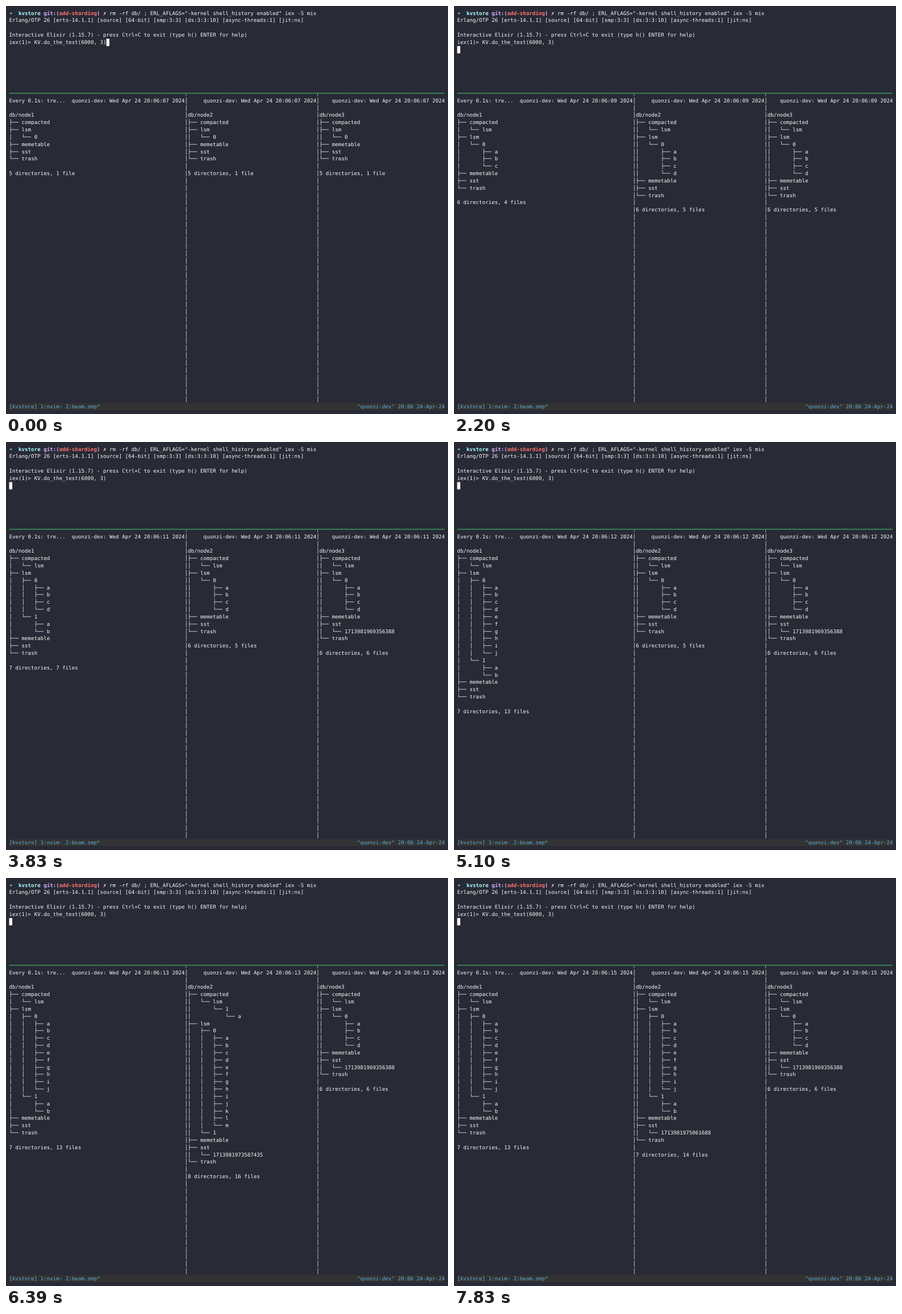
Recreate the animation shown at these times as an HTML page with a canvas. Size 778 px wide and 719 px high, loop 8 s.

```html
<!DOCTYPE html>
<html lang="en">
<head>
<meta charset="utf-8">
<title>Sharded store test</title>
<style>
html, body { margin: 0; width: 100%; height: 100%; overflow: hidden; background: #282a36; }
canvas { display: block; }
</style>
</head>
<body>
<canvas id="term" width="778" height="719"></canvas>
<script>
const ctx = document.getElementById('term').getContext('2d');
const LOOP = 8000, COLS = 139, ROWS = 55;
const W = 778 / (COLS + 2), H = 719 / (ROWS + 1), SIZE = H / 1.4;
const FONT = `${SIZE}px "DejaVu Sans Mono", "DejaVu Sans", monospace`;
const BG = '#282a36', FG = '#f8f8f2', GREEN = '#50fa7b', BAR = '#333333', BLUE = '#5eacd3';
const HOST = 'quonzi-dev';
const CLOCK = [840, 1790, 2820, 3830, 4780, 5780, 6800, 7780];

const cellX = col => (col + 1) * W;
const cellY = row => (row + 0.5) * H;

// Each word starts on its own terminal cell.
function text(col, row, str, color = FG, bold = false) {
  ctx.font = (bold ? 'bold ' : '') + FONT;
  ctx.fillStyle = color;
  for (const m of str.matchAll(/\S+/g)) {
    ctx.fillText(m[0], cellX(col + m.index), cellY(row) + SIZE);
  }
}

function cells(col, row, count, color) {
  ctx.fillStyle = color;
  ctx.fillRect(cellX(col), cellY(row), count * W, H);
}

// A run of steps that adds one segment at a steady pace.
const grow = (start, gap, from, to) =>
  Array.from({ length: to - from + 1 }, (_, i) => ({ t: start + i * gap, zero: from + i }));

// zero, one: segments per level; merge: segments in compaction.
// -1 is an empty entry for merge and a missing one for level one.
const START = { t: 0, zero: 0, one: -1, merge: null, sst: [] };
const first = [
  { t: 1690, merge: -1 },
  ...grow(1790, 105, 1, 3)
];

const s1 = ['971164208', '971409731', '971838116', '972047925'];
const s2 = ['973587435', '973701862', '974109347', '974386510', '975061688'];

const nodes = [
  { col: 0, width: 56, steps: [
    ...first,
    { t: 2310, zero: 4 },
    ...grow(2410, 101.4, 5, 12),
    { t: 3330, zero: 13, one: 0, merge: 1, sst: [s1[0]] },
    { t: 3430, zero: 15, merge: 2, sst: s1.slice(0, 2) },
    { t: 3540, zero: 16, sst: [s1[1]] },
    { t: 3640, zero: 4, one: 2, merge: -1, sst: [] },
    { t: 3950, sst: [s1[2]] },
    { t: 4150, sst: s1.slice(2) },
    { t: 4370, zero: 5, merge: 1 },
    { t: 4470, zero: 6, merge: 2 },
    { t: 4580, zero: 8, merge: 3 },
    { t: 4780, zero: 10, merge: 4, sst: [s1[3]] },
    { t: 4890, zero: 12, sst: s1.slice(2) },
    { t: 4990, zero: 10, merge: -1, sst: [s1[3]] },
    { t: 5100, sst: [] }
  ] },
  { col: 57, width: 41, steps: [
    ...first,
    { t: 2110, zero: 4 },
    ...grow(5160, 102.5, 5, 13),
    { t: 6190, merge: 0 },
    { t: 6290, one: 0, merge: 1 },
    { t: 6390, sst: [s2[0]] },
    { t: 6500, zero: 18, merge: 2, sst: s2.slice(0, 2) },
    { t: 6600, zero: 4, one: 2, merge: -1, sst: [] },
    { t: 6910, sst: [s2[2]] },
    { t: 7010, sst: s2.slice(2, 4) },
    ...grow(7210, 110, 5, 6),
    ...grow(7520, 100, 7, 8),
    { t: 7730, zero: 9, sst: [s2[3]] },
    { t: 7830, zero: 10, sst: [s2[4]] }
  ] },
  { col: 99, width: 40, steps: [
    ...first,
    { t: 2110, zero: 4 },
    { t: 2210, sst: ['969356388'] }
  ] }
];

const stateAt = (steps, t) =>
  Object.assign({}, START, ...steps.filter(s => s.t <= t));

const dir = (name, kids = []) => ({ name, kids });
const letters = n => Array.from({ length: n }, (_, i) => dir(String.fromCharCode(97 + i)));

function layout({ zero, one, merge, sst }) {
  const merging = merge !== null && merge >= 0 ? [dir('1', letters(merge))] : [];
  const levels = [dir('0', letters(zero))];
  if (one >= 0) levels.push(dir('1', letters(one)));
  return [
    dir('compacted', merge === null ? [] : [dir('lsm', merging)]),
    dir('lsm', levels),
    dir('memetable'),
    dir('sst', sst.map(id => dir('1713981' + id))),
    dir('trash')
  ];
}

function listing(tree) {
  const lines = [];
  let dirs = 0, files = 0;
  (function walk(items, indent) {
    items.forEach((item, i) => {
      const last = i === items.length - 1;
      lines.push(indent + (last ? '└── ' : '├── ') + item.name);
      if (indent && !item.kids.length) files++;
      else dirs++;
      walk(item.kids, indent + (last ? '    ' : '│   '));
    });
  })(tree, '');
  lines.push('', `${dirs} directories, ${files} file${files === 1 ? '' : 's'}`);
  return lines;
}

function drawShell(t) {
  text(0, 0, '➜', '#69ff94', true);
  text(3, 0, 'kvstore', '#a4ffff', true);
  text(11, 0, 'git:(', '#d6acff', true);
  text(16, 0, 'add-sharding', '#ff6e6e', true);
  text(28, 0, ')', '#d6acff', true);
  text(30, 0, '✗', '#ffffa5', true);
  text(32, 0, 'rm -rf db/ ; ERL_AFLAGS="-kernel shell_history enabled" iex -S mix');
  text(0, 1, 'Erlang/OTP 26 [erts-14.1.1] [source] [64-bit] [smp:3:3] [ds:3:3:10] [async-threads:1] [jit:ns]');
  text(0, 3, 'Interactive Elixir (1.15.7) - press Ctrl+C to exit (type h() ENTER for help)');
  text(0, 4, 'iex(1)> KV.do_the_test(6000, 3)');
  if (t < 1560) cells(31, 4, 1, FG);
  else cells(0, 5, 1, FG);
}

function drawBorders() {
  const line = Array(COLS).fill('─');
  line[56] = line[98] = '┬';
  text(0, 11, line.join(''), GREEN);
  for (let row = 12; row < ROWS - 1; row++) {
    text(56, row, '│');
    text(98, row, '│');
  }
}

function drawNode({ col, width, steps }, i, t) {
  const sec = 7 + CLOCK.filter(c => c <= t).length;
  const stamp = `${HOST}: Wed Apr 24 20:06:${String(sec).padStart(2, '0')} 2024`;
  text(col + width - stamp.length, 12, stamp);
  text(col, 14, 'db/node' + (i + 1));
  listing(layout(stateAt(steps, t))).forEach((str, n) => text(col, 15 + n, str));
}

function drawStatus() {
  const info = `"${HOST}" 20:06 24-Apr-24`;
  cells(0, ROWS - 1, COLS, BAR);
  text(0, ROWS - 1, '[kvstore] 1:nvim- 2:beam.smp*', BLUE);
  text(COLS - info.length, ROWS - 1, info, BLUE);
}

function draw() {
  const t = performance.now() % LOOP;
  ctx.textRendering = 'geometricPrecision';
  ctx.fillStyle = BG;
  ctx.fillRect(0, 0, 778, 719);
  drawShell(t);
  drawBorders();
  text(0, 12, 'Every 0.1s: tre...');
  nodes.forEach((node, i) => drawNode(node, i, t));
  drawStatus();
  requestAnimationFrame(draw);
}
draw();
</script>
</body>
</html>
```
